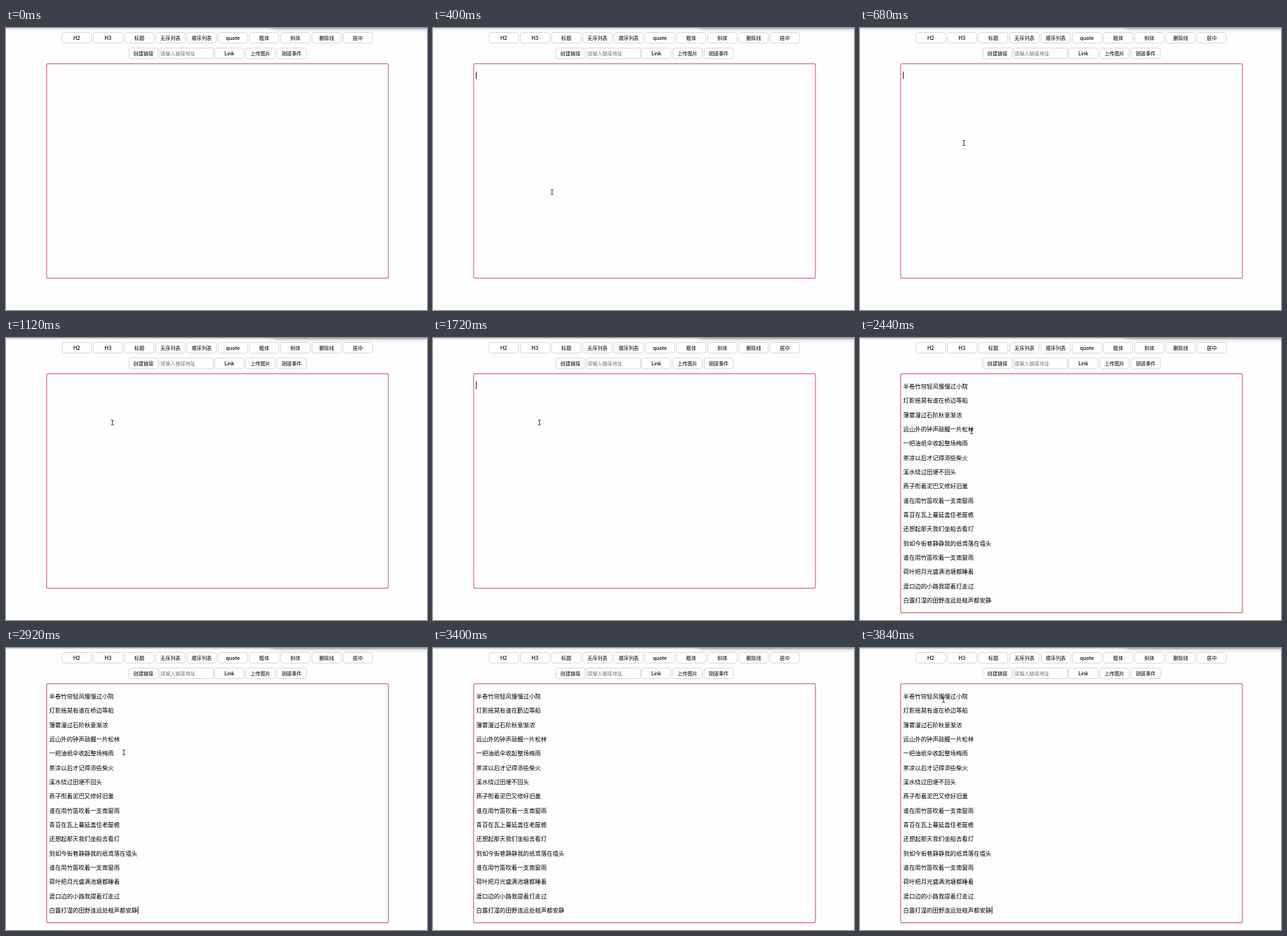
Animation of 600 by 402 pixels, one loop 3880 ms. Source, as an HTML page:

```html
<!DOCTYPE html>
<html lang="zh-CN">
<head>
<meta charset="utf-8">
<title>Editor</title>
<style>
html, body { margin: 0; width: 100%; height: 100%; overflow: hidden; background: #fdfcfe; }
svg { display: block; width: 600px; height: 402px; }
text { font-family: Inter, "Noto Sans CJK SC", "Noto Sans CJK", sans-serif; font-weight: 500; fill: #000; }
.label { font-size: 7.15px; text-anchor: middle; }
.hint { font-size: 7.15px; font-weight: 400; fill: #757575; }
.line { font-size: 8.4px; }
.box { fill: #fffeff; stroke: #d3d2d5; stroke-width: .9; }
</style>
</head>
<body>
<svg id="stage" viewBox="0 0 600 402">
  <defs>
    <linearGradient id="edge" x2="0" y2="1">
      <stop stop-color="#c4c4c6"/><stop offset="1" stop-color="#c4c4c6" stop-opacity="0"/>
    </linearGradient>
    <filter id="soft" x="-20%" y="-200%" width="140%" height="500%"><feGaussianBlur stdDeviation="3.5"/></filter>
  </defs>
  <rect width="600" height="2" fill="url(#edge)"/>
  <rect x="374" y="-40" width="260" height="40" rx="10" fill="#000" opacity=".42" filter="url(#soft)"/>
  <g id="toolbar"></g>
  <rect id="editor" x="57.9" y="50.8" width="487.1" rx="2.2" fill="none" stroke="#db6b79" stroke-width="1.2"/>
  <g id="lines"></g>
  <rect id="caret" width="1" height="10.5" fill="#111"/>
  <path id="pointer" d="M-2-3.6Q0-3.6 0-2.6Q0-3.6 2-3.6M0-2.6V2.6M-2 3.6Q0 3.6 0 2.6Q0 3.6 2 3.6" fill="none" stroke="#222" stroke-width=".9"/>
</svg>
<script>
const LOOP = 3880, POINTER_IN = 200, PASTE = 1840;
const $ = id => document.getElementById(id);

const rows = [
  { x: 80, y: 6.5, labels: ["H2", "H3", "标题", "无序列表", "顺序列表", "quote", "粗体", "斜体", "删除线", "居中"] },
  { x: 175, y: 28.6, labels: ["创建链接"] },
  { x: 297.3, y: 28.6, labels: ["Link", "上传图片", "销毁事件"] }
];
const poem = `半卷竹帘轻风慢慢过小院
灯影摇晃有谁在桥边等船
薄雾漫过石阶秋意渐浓
远山外的钟声敲醒一片松林
一把油纸伞收起整场梅雨
茶凉以后才记得添些柴火
溪水绕过田埂不回头
燕子衔着泥巴又修好旧巢
谁在用竹笛吹着一支南窗雨
青苔在瓦上蔓延盖住老屋檐
还想起那天我们坐船去看灯
到如今街巷静静我的纸鸢落在墙头
谁在用竹笛吹着一支南窗雨
荷叶把月光盛满池塘都睡着
渡口边的小路我提着灯走过
白露打湿的田野连远处蛙声都安静`.split("\n");

const box = (x, y, w, r) => `<rect class="box" x="${x}" y="${y}" width="${w}" height="15" rx="${r}"/>`;
const label = (cls, x, y, s) => `<text class="${cls}" x="${x}" y="${y}">${s}</text>`;

$("toolbar").innerHTML = rows.map(({ x, y, labels }) => labels.map((s, i) => {
  const left = x + i * 44.5;
  return box(left, y, 41.8, 3) + label("label", left + 20.9, y + 10.1, s);
}).join("")).join("") + box(219.3, 28.6, 76.3, 1) + label("hint", 220, 38.7, "请输入链接地址");
$("lines").innerHTML = poem.map((s, i) => label("line", 61.6, 72 + i * 20.33, s)).join("");

// Pointer path: time, x, y
const path = [
  [200, 188, 294], [440, 166, 222], [600, 150, 172], [680, 148, 164], [720, 150, 161],
  [920, 154, 135], [1040, 153, 119.5], [1120, 151.7, 120.5], [2240, 151.7, 120.5], [2520, 162, 138],
  [2760, 168, 149], [2920, 168, 149], [3120, 158, 131], [3360, 134, 96], [3400, 122, 89],
  [3600, 119, 78], [3840, 119, 74], [LOOP, 119, 74]
];

function pointerAt(t) {
  const k = Math.max(1, path.findIndex(p => p[0] > t));
  const [t0, x0, y0] = path[k - 1], [t1, x1, y1] = path[k];
  const u = (t - t0) / (t1 - t0);
  return [x0 + (x1 - x0) * u, y0 + (y1 - y0) * u];
}

function caretOn(t) {
  if (t >= PASTE) return Math.floor((t - PASTE) / 500) % 2 === 0;
  return (t >= POINTER_IN && t < 720) || t >= 1280;
}

const show = (el, on) => el.setAttribute("visibility", on ? "visible" : "hidden");

function draw(now) {
  const t = Math.floor(now % LOOP / 40) * 40;
  const pasted = t >= PASTE;
  $("editor").setAttribute("height", pasted ? 340.8 : 305.8);
  $("editor").setAttribute("stroke", pasted ? "#d06a74" : "#db6b79");
  show($("lines"), pasted);
  show($("caret"), caretOn(t));
  $("caret").setAttribute("x", pasted ? 187.6 : 61.2);
  $("caret").setAttribute("y", pasted ? 368.5 : 62.3);
  show($("pointer"), t >= POINTER_IN);
  if (t >= POINTER_IN) $("pointer").setAttribute("transform", `translate(${pointerAt(t)})`);
}

function tick() {
  draw(performance.now());
  requestAnimationFrame(tick);
}
tick();
</script>
</body>
</html>
```
